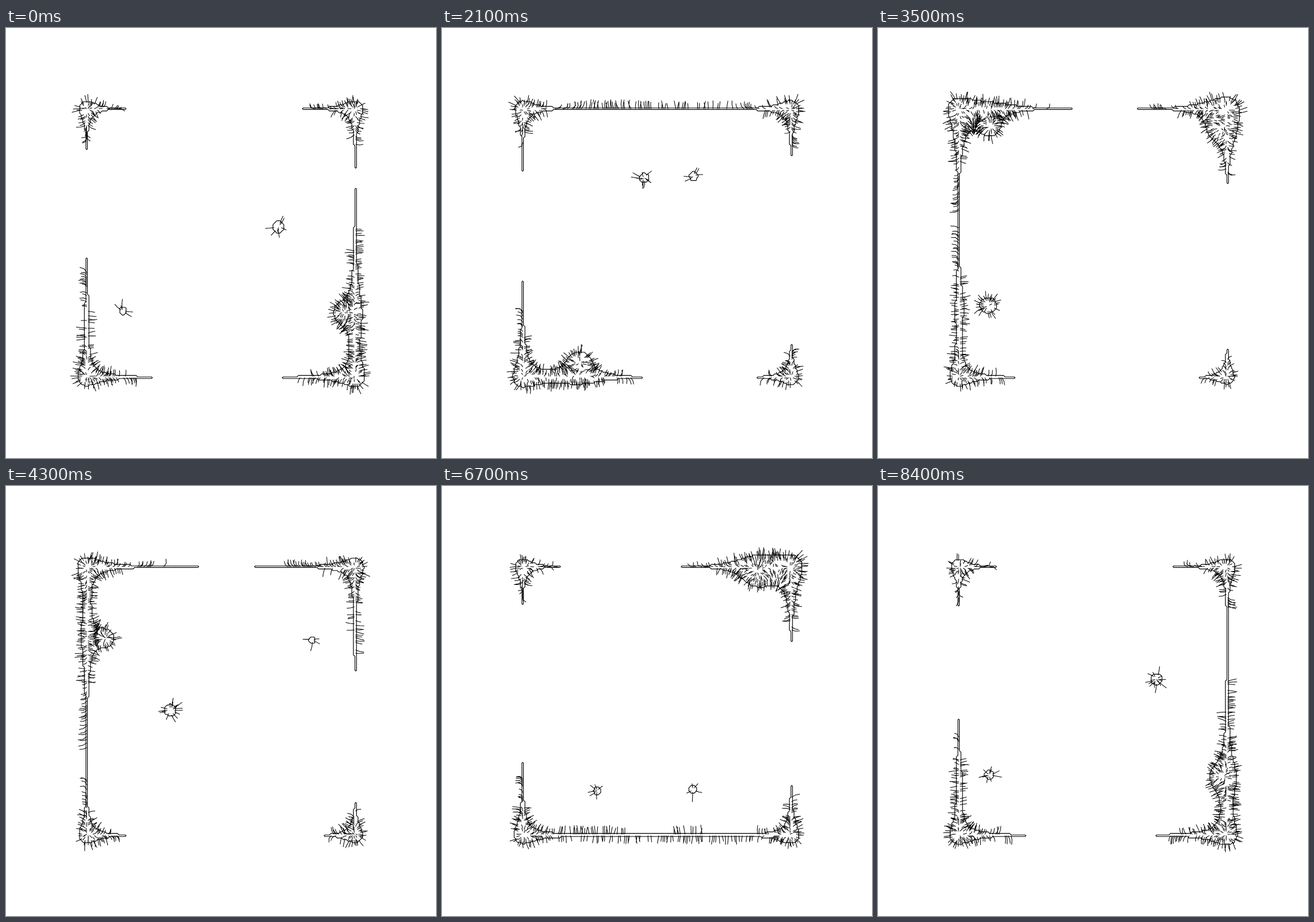
These frames come from a looping animation (748x748 px, 8500 ms). An HTML page:

```html
<!DOCTYPE html>
<html lang="en">
<head>
<meta charset="utf-8">
<title>Hairy metaballs</title>
<style>
  html, body { margin: 0; width: 100%; height: 100%; overflow: hidden; background: #fff; }
  svg { display: block; width: 100vw; height: 100vh; }
  path { fill: none; stroke: #000; stroke-linecap: round; stroke-linejoin: round; }
</style>
</head>
<body>
<svg viewBox="0 0 748 748">
  <path id="outline" stroke-width="1.15"/>
  <path id="hairs" stroke-width="1.05"/>
</svg>
<script>
const LOOP = 8500, STEP = 100;
const LO = 140.3, HI = 607.5;       // walls
const SIDE = 468;                   // length of one crossing
const SOFT = 21;                    // falloff of every source
const LEVEL = 1.524, HAIR_LEVEL = LEVEL + 0.035;
const CELL = 2.69, PAD = 16, N = 207;

// distance travelled per axis at given seconds
const TRAVEL = [[0, 0], [2.1, 234], [3.5, 388], [4.3, 480], [5.9, 660], [7.5, 824], [8.4, 926], [8.5, 936]];

// start phase on each axis and strength
const BALLS = [
  { u: 602, v: 206, g: 1.43 },
  { u: 64, v: 584, g: 1.13 },
  { u: 491, v: 581, g: 1.18 }
];

const outline = document.getElementById('outline');
const hairs = document.getElementById('hairs');
const grid = new Float64Array(N * N);
const at = i => LO + (i - PAD) * CELL;
const fall = d => SOFT / (SOFT + d);
const fix = n => n.toFixed(1);

function travelled(sec) {
  let i = 1;
  while (sec > TRAVEL[i][0]) i++;
  const [t0, d0] = TRAVEL[i - 1], [t1, d1] = TRAVEL[i];
  return d0 + (d1 - d0) * (sec - t0) / (t1 - t0);
}

function bounce(u) {
  u %= 2 * SIDE;
  return 140 + (u < SIDE ? u : 2 * SIDE - u);
}

function random(seed) {
  return () => {
    seed = seed + 0x6D2B79F5 | 0;
    let t = Math.imul(seed ^ seed >>> 15, 1 | seed);
    t = t + Math.imul(t ^ t >>> 7, 61 | t) ^ t;
    return ((t ^ t >>> 14) >>> 0) / 4294967296;
  };
}

function field(x, y) {
  const ox = Math.max(LO - x, 0, x - HI), oy = Math.max(LO - y, 0, y - HI);
  let f = fall(Math.hypot(x - LO, oy)) + fall(Math.hypot(x - HI, oy))
        + fall(Math.hypot(y - LO, ox)) + fall(Math.hypot(y - HI, ox));
  for (const b of BALLS) f += b.g * fall(Math.hypot(x - b.x, y - b.y));
  return f;
}

// marching squares through edge midpoints
function contour() {
  let d = '';
  const half = CELL / 2;
  for (let j = 0; j < N - 1; j++) {
    for (let i = 0; i < N - 1; i++) {
      const k = j * N + i;
      const a = grid[k] > LEVEL, b = grid[k + 1] > LEVEL;
      const c = grid[k + N + 1] > LEVEL, e = grid[k + N] > LEVEL;
      if (a === b && b === c && c === e) continue;
      const x = at(i), y = at(j), cut = [];
      if (a !== b) cut.push([x + half, y]);
      if (b !== c) cut.push([x + CELL, y + half]);
      if (c !== e) cut.push([x + half, y + CELL]);
      if (e !== a) cut.push([x, y + half]);
      for (let n = 0; n < cut.length; n += 2) {
        const p = cut[n], q = cut[n + 1];
        d += `M${fix(p[0])} ${fix(p[1])}L${fix(q[0])} ${fix(q[1])}`;
      }
    }
  }
  return d;
}

// short line running downhill from a point, turned a little by lean
function hair(x, y, length, lean) {
  const eps = 6, parts = 2;
  const cos = Math.cos(lean), sin = Math.sin(lean);
  let d = `M${fix(x)} ${fix(y)}L`;
  for (let n = 0; n < parts; n++) {
    const gx = field(x - eps, y) - field(x + eps, y);
    const gy = field(x, y - eps) - field(x, y + eps);
    const s = length / parts / (Math.hypot(gx, gy) || 1);
    x += (gx * cos - gy * sin) * s;
    y += (gx * sin + gy * cos) * s;
    d += `${fix(x)} ${fix(y)} `;
  }
  return d;
}

function fur(seed) {
  const rnd = random(seed);
  let d = '';
  for (let j = 0; j < N; j++) {
    for (let i = 0; i < N; i++) {
      const f = grid[j * N + i];
      if (f < HAIR_LEVEL) continue;
      const near = Math.exp((LEVEL - f) / 0.2);
      if (rnd() < 0.3 + 0.3 * near) {
        const length = (4 + 11 * near) * (0.75 + 0.5 * rnd());
        d += hair(at(i), at(j), length, 0.5 * (rnd() - 0.5));
      }
    }
  }
  return d;
}

function draw(frame) {
  const s = travelled(frame * STEP / 1000);
  for (const b of BALLS) {
    b.x = bounce(b.u + s);
    b.y = bounce(b.v + s);
  }
  for (let j = 0; j < N; j++)
    for (let i = 0; i < N; i++) grid[j * N + i] = field(at(i), at(j));
  outline.setAttribute('d', contour());
  hairs.setAttribute('d', fur(frame * 7919 + 17));
}

let shown = -1;
const start = performance.now();
function tick() {
  const frame = Math.floor(((performance.now() - start) % LOOP) / STEP);
  if (frame !== shown) draw(shown = frame);
  requestAnimationFrame(tick);
}
tick();
</script>
</body>
</html>
```
